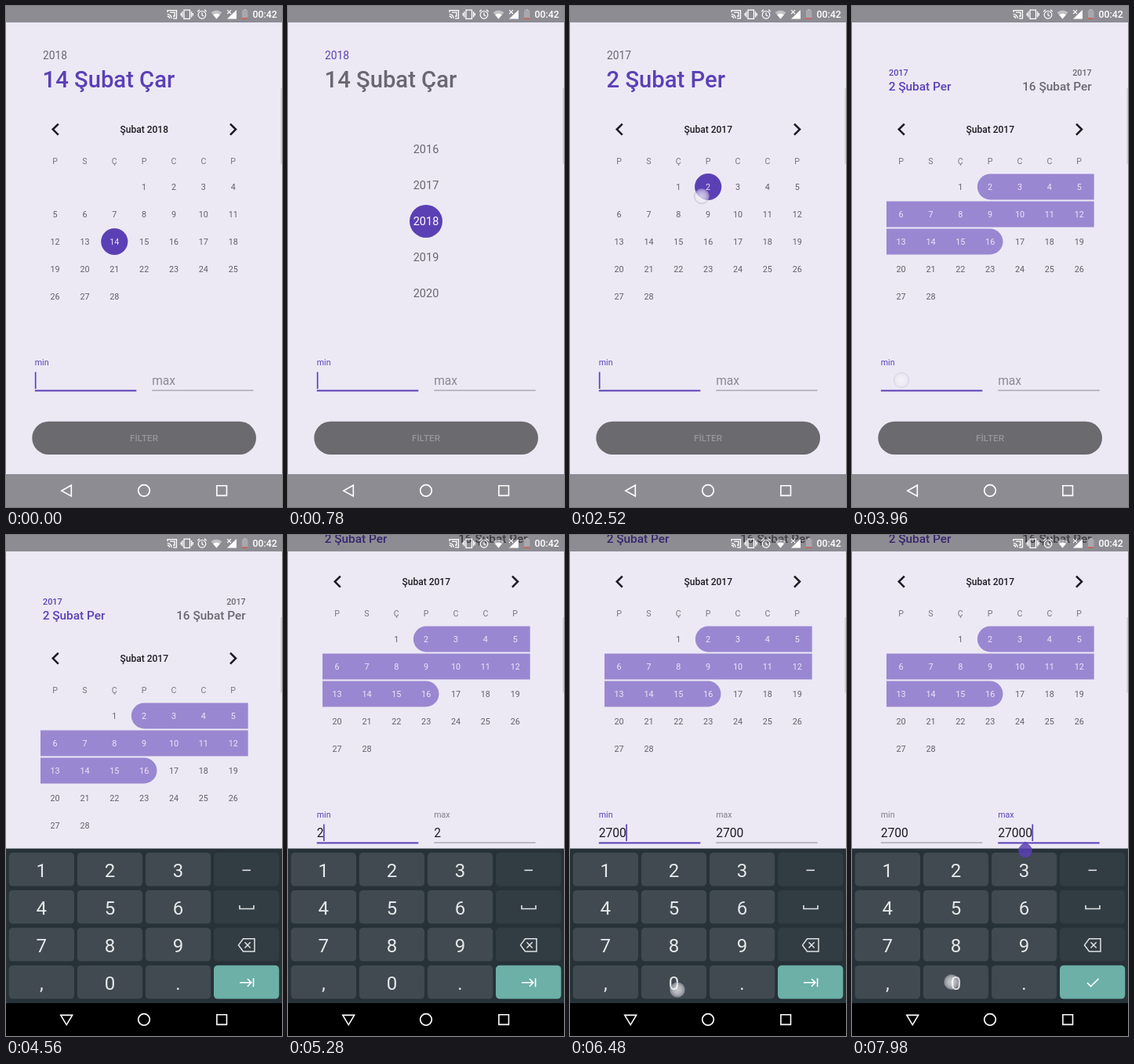
Recreate the animation shown at these times as an HTML page. Size 352x640 px, loop 8 s.

```html
<!DOCTYPE html>
<html lang="tr">
<head>
<meta charset="utf-8">
<title>Tarih filtresi</title>
<style>
html, body { margin: 0; width: 100%; height: 100%; overflow: hidden; background: #ece9f5; }
svg { display: block; width: 352px; height: 640px; font-family: Roboto, sans-serif; }
.m { text-anchor: middle; }
.line { fill: none; stroke: #fff; }
</style>
</head>
<body>
<svg id="stage" viewBox="0 0 352 640" xmlns="http://www.w3.org/2000/svg"></svg>
<script>
const LOOP = 8000;
const PURPLE = '#5b40b5', GREY = '#69676f', INK = '#1d1c22', LINE = '#a3a0aa';
const stage = document.getElementById('stage');
const $ = id => document.getElementById(id);

const text = (x, y, size, fill, str, extra = '') =>
  `<text x="${x}" y="${y}" font-size="${size}" fill="${fill}" ${extra}>${str}</text>`;
const rect = (x, y, w, h, fill, extra = '') =>
  `<rect x="${x}" y="${y}" width="${w}" height="${h}" fill="${fill}" ${extra}/>`;
const path = (d, width, extra = '') =>
  `<path class="line" d="${d}" stroke-width="${width}" ${extra}/>`;
const MID = 'class="m"', MED = 'font-weight="500"';

const colX = c => 62.6 + 37.85 * c;
const rowY = r => 231 + 35 * r;
const keyX = c => 3.7 + 87.1 * c;
const keyY = r => 405.8 + 48 * r;

function statusBar() {
  return rect(0, 0, 352, 21, '#000', 'opacity=".4"') +
    path('M206 8V5.6H217.5V15.8H213M205.8 10.4A5.4 5.4 0 0 1 211.2 15.8M205.8 13A2.8 2.8 0 0 1 208.6 15.8M209 8.2H215V13H213', 1.3) +
    path('M227 5.2H234.5V16.4H227ZM224.9 7V14.6M236.6 7V14.6M223.2 9V12.6M238.3 9V12.6', 1.3) +
    path('M245.2 11.3a4.8 4.8 0 1 0 9.6 0a4.8 4.8 0 1 0 -9.6 0M250 8.3V11.6L252.2 13M244.2 7.2L247 4.8M255.8 7.2L253 4.8', 1.2) +
    '<path d="M261.5 8.2Q268.5 2.8 275.5 8.2L268.5 16.6Z" fill="#fff" opacity=".45"/>' +
    '<path d="M264.2 11.2Q268.5 8 272.8 11.2L268.5 16.6Z" fill="#fff"/>' +
    '<path d="M294 5V16.5H282Z" fill="#fff"/>' +
    path('M282.2 5.2L287 10M287 5.2L282.2 10', 1.1) +
    rect(303, 4, 3.4, 2, '#b9b6bd') + rect(301, 5.3, 7.4, 11.4, '#aaa7ae', 'rx=".8"') +
    rect(301, 15.2, 7.4, 1.6, '#c4604f') +
    text(314.6, 15.4, 12.3, '#fff', '00:42', MED);
}

function keyboard() {
  const digits = ['1', '2', '3', '4', '5', '6', '7', '8', '9', ',', '0', '.'];
  let s = rect(0, 400.5, 352, 240, '#263238');
  for (let r = 0; r < 4; r++) for (let c = 0; c < 4; c++) {
    const fill = c < 3 ? '#404a50' : r < 3 ? '#323d43' : '#6cb0a8';
    s += rect(keyX(c), keyY(r), 83.3, 42.8, fill, 'rx="5"');
    if (c < 3) s += text(keyX(c) + 41.6, keyY(r) + 31, 24, '#e6e9ea', digits[r * 3 + c], MID);
  }
  return s + rect(0, 0, 83.3, 42.8, '#fff', 'id="press" rx="5"') +
    '<g opacity=".85">' + path('M301.5 428.3H312', 1.6) +
    path('M298 473V477.5H316V473', 1.6) +
    path('M302.5 515.8H317V532H302.5L296.5 523.9ZM304.5 520.3L311.7 527.5M311.7 520.3L304.5 527.5', 1.5) + '</g>' +
    path('M298 571.8H312.5M308 567L312.8 571.8L308 576.6M315.6 566.3V577.3', 1.6, 'id="next"') +
    path('M300 572L304.6 576.6L314.5 566.8', 1.6, 'id="done"');
}

function field(id, x, label) {
  return text(x, 459.3, 10.6, GREY, label, `id="${id}Label"`) +
    text(x, 484, 15.6, INK, '', `id="${id}Text"`) +
    rect(x, 490.4, 129.5, 1.3, LINE, `id="${id}Line"`);
}

function yearList() {
  let s = `<circle cx="176" cy="275" r="21" fill="${PURPLE}" id="yearDot"/>`;
  for (let y = 2016; y <= 2020; y++)
    s += text(176, 280 + (y - 2018) * 46, 14.5, GREY, y, `${MID} id="y${y}"`);
  return s;
}

stage.innerHTML = `
<defs><radialGradient id="glow">
  <stop offset="0" stop-color="#fff" stop-opacity=".72"/>
  <stop offset=".6" stop-color="#f2f1f6" stop-opacity=".62"/>
  <stop offset="1" stop-color="#dddbe4" stop-opacity=".42"/>
</radialGradient></defs>
${rect(0, 0, 352, 640, '#ece9f5')}
<g id="page">
  <g id="head"></g>
  <g id="cal"></g>
  <g id="years">${yearList()}</g>
  ${field('min', 36.8, 'min')}${field('max', 186.2, 'max')}
  ${rect(0, 467.5, 1.7, 21.5, PURPLE, 'id="caret"')}
  ${rect(33.3, 530.7, 285.7, 42.3, '#6b6a6e', 'rx="21.1"')}
  ${text(176, 556, 11.7, '#98969c', 'FİLTER', MID + ' ' + MED)}
</g>
${rect(350.4, 105, 1.6, 96.5, '#cfccd7')}
${statusBar()}
${rect(0, 598, 352, 42, '#000', 'id="nav"')}
<g id="kb">${keyboard()}</g>
${rect(0, 598, 352, 42, '#000', 'id="navTop"')}
${path('M83.3 612.2V626.2L70.8 619.2Z', 1.6, 'id="back"')}
${path('M69.8 613.4H84.6L77.2 625.8Z', 1.6, 'id="hide"')}
<circle class="line" cx="176" cy="619" r="7.3" stroke-width="1.7"/>
${path('M268.9 612.8H281.5V625.4H268.9Z', 1.6)}
<path id="handle" d="M221 391.5L227.3 397A8.8 8.8 0 1 1 214.7 397Z" fill="${PURPLE}" opacity=".85"/>
<circle id="dot" r="9.5" fill="url(#glow)" stroke="#8e88a8" stroke-opacity=".4"/>`;

const clamp = v => Math.max(0, Math.min(1, v));
const seg = (t, a, b) => { const v = clamp((t - a) / (b - a)); return v * v * (3 - 2 * v); };
const set = (id, attrs) => { for (const k in attrs) $(id).setAttribute(k, attrs[k]); };
const show = (id, on) => set(id, { visibility: on ? 'visible' : 'hidden' });
// last entry of [time, value] pairs that has been reached
const at = (list, t) => list.reduce((v, [when, next]) => t >= when ? next : v, list[0][1]);

const DAY_NAMES = ['Pzt', 'Sal', 'Çar', 'Per', 'Cum', 'Cmt', 'Paz'];
const HEADS = [...'PSÇPCCP'];
const BLINKS = [0, 4260, 5100, 5520, 5940, 6420, 6900, 7440, 7920].map(v => [v, v]);
const MIN = [[0, ''], [5100, '2'], [5520, '27'], [5940, '270'], [6420, '2700']];
const MAX = [...MIN, [7920, '27000']];
// x, y, down, up, then optional drag target and its time span
const TAPS = [
  [62, 64, 120, 290], [176, 230, 990, 1150],
  [168, 243, 2340, 3400, 172, 303, 2620, 3200],
  [63, 478, 3760, 3900], [134, 434, 4990, 5100], [46, 528, 5420, 5530],
  [135, 576, 5840, 5950], [137, 581, 6350, 6480], [307, 573, 6790, 6910],
  [291, 381, 7290, 7440], [127, 571, 7850, 7990]
];
// key column, row, press time
const PRESSES = [[1, 0, 5010], [0, 2, 5430], [1, 3, 5850], [1, 3, 6330], [3, 3, 6810], [1, 3, 7830]];

const firstCol = year => year === 2018 ? 3 : 2;
const dateName = (year, d) => `${d} Şubat ${DAY_NAMES[(firstCol(year) + d - 1) % 7]}`;

function header(year, from, to, picking) {
  if (!to) return text(47, 68.4, 13.8, picking ? PURPLE : GREY, year) +
    text(46.6, 103.8, 29.2, picking ? GREY : PURPLE, dateName(year, from), MED);
  const end = MED + ' text-anchor="end"';
  return text(47, 89, 10.8, PURPLE, year, MED) + text(46.7, 107.8, 15.4, PURPLE, dateName(year, from), MED) +
    text(305.7, 89, 10.8, GREY, year, end) + text(305.7, 107.8, 15.4, GREY, dateName(year, to), end);
}

function band(r, a, b, roundA, roundB) {
  const x0 = a ? colX(a) - 16.3 : 44, x1 = b < 6 ? colX(b) + 16.3 : 308.7;
  const y = rowY(r) - 16.4, h = 32.8, q = h / 2;
  const left = roundA ? `H${x0 + q}A${q} ${q} 0 0 1 ${x0 + q} ${y}` : `H${x0}V${y}`;
  const right = roundB ? `H${x1 - q}A${q} ${q} 0 0 1 ${x1 - q} ${y + h}` : `H${x1}V${y + h}`;
  return `<path d="M${(x0 + x1) / 2} ${y}${right}${left}Z" fill="#9a87d1"/>`;
}

function calendar(year, from, to) {
  const off = firstCol(year) - 1, last = to || from;
  let s = path('M66.8 150.6L59.8 157.6L66.8 164.6M286 150.6L293 157.6L286 164.6', 2.6, `style="stroke:${INK}"`) +
    text(176.3, 161.8, 12, INK, 'Şubat ' + year, MID + ' ' + MED);
  HEADS.forEach((h, c) => s += text(colX(c), 201.6, 10.6, '#77757d', h, MID));
  if (to) {
    const r0 = Math.floor((from + off) / 7), r1 = Math.floor((to + off) / 7);
    for (let r = r0; r <= r1; r++)
      s += band(r, r === r0 ? (from + off) % 7 : 0, r === r1 ? (to + off) % 7 : 6, r === r0, r === r1);
  } else {
    const n = from + off;
    s += `<circle cx="${colX(n % 7)}" cy="${rowY(Math.floor(n / 7))}" r="17.1" fill="${PURPLE}"/>`;
  }
  for (let d = 1; d <= 28; d++) {
    const n = d + off, on = d >= from && d <= last;
    s += text(colX(n % 7), rowY(Math.floor(n / 7)) + 3.9, 10.8, on ? '#ebe6f8' : '#626068', d, MID);
  }
  return s;
}

let built = '';
function buildDate(t) {
  const year = t < 1160 ? 2018 : 2017;
  const from = t < 2460 ? 14 : 2;
  const to = at([[0, 0], [2820, 9], [3090, 16]], t);
  const picking = t >= 300 && t < 1160;
  const key = [year, from, to, picking].join();
  if (key === built) return;
  built = key;
  $('head').innerHTML = header(year, from, to, picking);
  $('cal').innerHTML = calendar(year, from, to);
  set('yearDot', { cy: 275 + (year - 2018) * 46 });
  for (let y = 2016; y <= 2020; y++) set('y' + y, { fill: y === year ? '#fff' : GREY });
}

function updateField(id, value, active, lift) {
  set(id + 'Label', {
    fill: active ? PURPLE : lift < 1 ? '#8c8992' : '#807d87',
    y: 483.6 - 24.3 * lift, 'font-size': 15.6 - 5 * lift
  });
  $(id + 'Text').textContent = value;
  set(id + 'Line', { fill: active ? PURPLE : LINE, height: active ? 2 : 1.3 });
}

function updateTouch(t) {
  const tap = TAPS.find(([, , a, b]) => t >= a && t < b + 150);
  show('dot', tap);
  if (tap) {
    const [x, y, a, b, x2 = x, y2 = y, m0 = a, m1 = b] = tap;
    const k = seg(t, m0, m1);
    set('dot', {
      cx: x + (x2 - x) * k, cy: y + (y2 - y) * k,
      opacity: clamp((t - a) / 50) * (1 - clamp((t - b) / 150))
    });
  }
  const press = PRESSES.find(p => t >= p[2] && t < p[2] + 110);
  show('press', press);
  if (press) set('press', { x: keyX(press[0]), y: keyY(press[1]), opacity: .12 });
}

function render(t) {
  buildDate(t);
  const picker = seg(t, 300, 480) - seg(t, 1170, 1400);
  set('cal', { opacity: 1 - picker });
  set('years', { opacity: picker });
  set('page', { transform: `translate(0 ${-98 * seg(t, 4560, 4740)})` });

  const onMax = t >= 6900, min = at(MIN, t), max = at(MAX, t);
  updateField('min', min, !onMax, 1);
  updateField('max', max, onMax, seg(t, 5100, 5230));
  const typed = !onMax ? min.length : t < 7440 ? 0 : max.length;
  set('caret', { x: (onMax ? 186.2 : 36.8) + typed * 8.76 - (typed ? .6 : 0) });
  show('caret', Math.floor((t - at(BLINKS, t)) / 300) % 2 === 0);

  const open = t >= 4080, rise = seg(t, 4080, 4320);
  show('kb', open);
  set('kb', { transform: `translate(0 ${198 * (1 - rise)})` });
  set('nav', { opacity: open ? 1 : .4 });
  show('navTop', open);
  show('back', !open);
  show('hide', open);
  show('next', open && !onMax);
  show('done', onMax);
  show('handle', t >= 7440);
  updateTouch(t);
}

const start = performance.now();
function frame() {
  render((performance.now() - start) % LOOP);
  requestAnimationFrame(frame);
}
frame();
</script>
</body>
</html>
```
